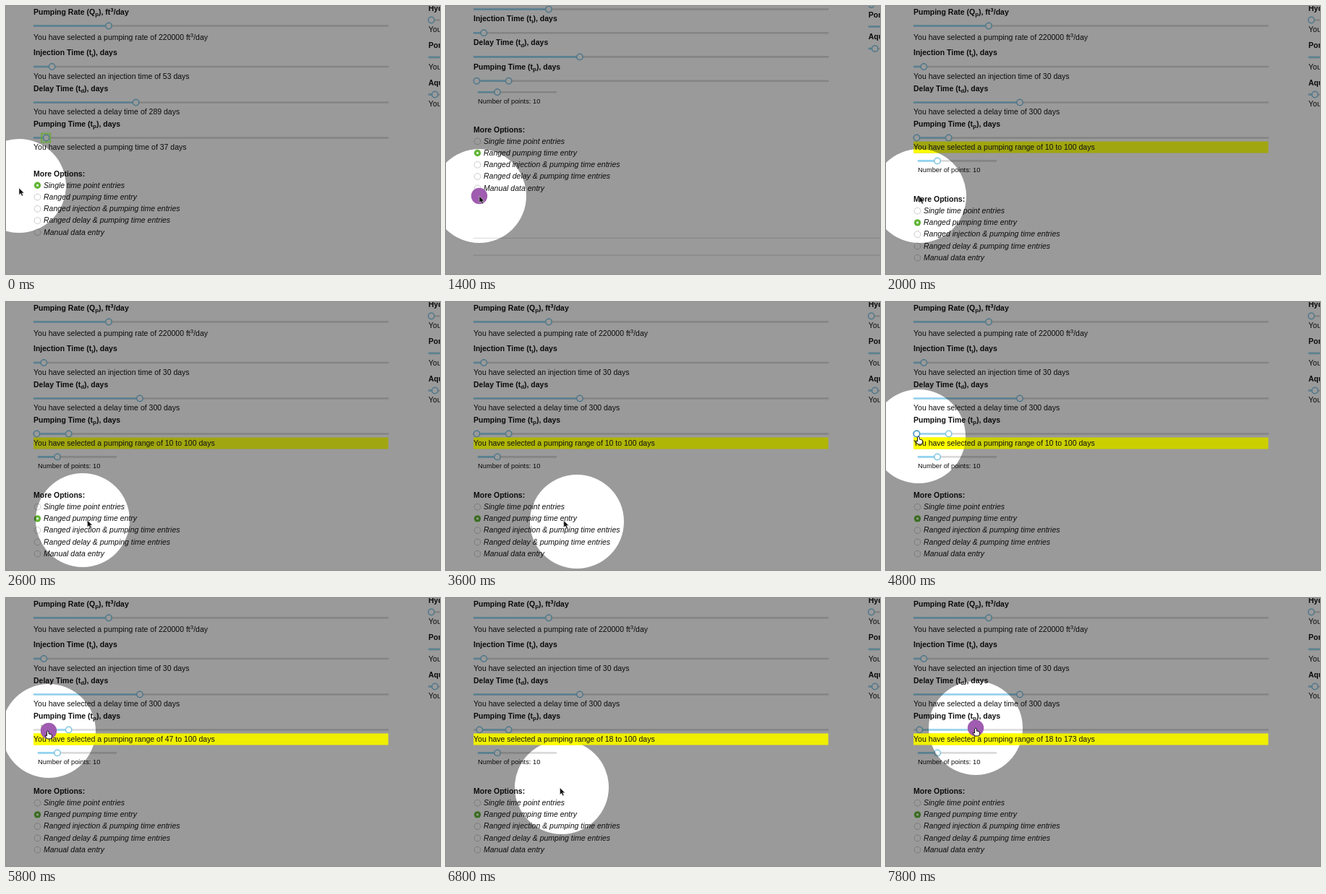
An HTML page that plays this animation: 600 by 371 pixels, repeating every 8000 ms.

```html
<!DOCTYPE html>
<html lang="en">
<head>
<meta charset="utf-8">
<title>Pumping time sliders</title>
<style>
  html, body { margin: 0; width: 100%; height: 100%; overflow: hidden; background: #999; }
  svg { display: block; width: 100%; height: 100%; }
  text { font: 10.5px "Liberation Sans", Arial, sans-serif; fill: #111; white-space: pre; }
  .b { font-weight: bold; }
  .i { font-style: italic; }
  .s { font-size: 9.3px; }
  .small { font-size: 7.9px; }
</style>
</head>
<body>
<svg id="stage" viewBox="0 0 600 371"></svg>
<script>
const LOOP = 8000, STEP = 200, LEAD = 50, R = 65;
const BLUE = '#93d5f0', TRACK = '#dadada';
const stage = document.getElementById('stage');

// time, x, y of the spotlight; the pointer runs slightly ahead of it
const path = [
  [0, 18, 249], [200, 18, 261], [600, 140, 159], [800, 166, 190],
  [1200, 46, 263], [2200, 46, 263], [2400, 67, 262], [2600, 106, 302],
  [3200, 184, 304], [3600, 181, 304], [3800, 108, 298], [4400, 45, 186],
  [5000, 45, 186], [5800, 59, 184], [6400, 46, 183], [6800, 160, 262],
  [7000, 150, 265], [7200, 150, 265], [7400, 88, 181], [7800, 124, 180]
];
const lowDays = [[5000, 10], [5800, 47], [6400, 18]];
const highDays = [[7400, 100], [7800, 173]];

function at(keys, t) {
  const next = keys.findIndex(k => k[0] > t);
  if (next === 0) return keys[0].slice(1);
  if (next < 0) return keys[keys.length - 1].slice(1);
  const a = keys[next - 1], b = keys[next], p = (t - a[0]) / (b[0] - a[0]);
  return a.slice(1).map((v, i) => v + (b[i + 1] - v) * p);
}

const within = (t, from, to) => t >= from && t < to;
const dayX = days => 37.5 + days * .4915;
const text = (x, y, str, cls = '') => `<text x="${x}" y="${y}" class="${cls}">${str}</text>`;
const shifted = (str, dy) =>
  `<tspan class="small" dy="${dy}">${str}</tspan><tspan dy="${-dy}">\u200b</tspan>`;
const sub = str => shifted(str, 2.6);
const sup = str => shifted(str, -4);
const circle = (x, y, r, attrs = '') => `<circle cx="${x}" cy="${y}" r="${r}" ${attrs}/>`;
const line = (x1, x2, y, color, w = 2.6) =>
  `<path d="M${x1} ${y}H${x2}" stroke="${color}" stroke-width="${w}" stroke-linecap="round"/>`;
const thumb = (x, y, color = '#7fc4e2') =>
  circle(x, y, 4.2, `fill="#fff" stroke="${color}" stroke-width="1.5"`);

function slider(y, from, to, thumbs, x1 = 39, x2 = 528) {
  return line(x1, x2, y, TRACK) + line(from, to, y, BLUE) + thumbs.map(x => thumb(x, y)).join('');
}

function radios(top, selected) {
  const names = ['Single time point entries', 'Ranged pumping time entry',
    'Ranged injection &amp; pumping time entries', 'Ranged delay &amp; pumping time entries',
    'Manual data entry'];
  return text(38, top, 'More Options:', 'b') + names.map((name, i) => {
    const y = top + 16 + i * 16.25;
    const mark = i === selected
      ? circle(43.5, y - 3.2, 4.7, 'fill="#62b536"') + circle(43.5, y - 3.2, 1.5, 'fill="#fff"')
      : circle(43.5, y - 3.2, 4.4, 'fill="#fff" stroke="#c4c4c4" stroke-width=".9"');
    return mark + text(52, y, name, 'i');
  }).join('');
}

function sideGroup(label, labelY, trackY, filledTo, thumbX) {
  return text(584, labelY, label, 'b') + line(585, 602, trackY, TRACK) +
    line(585, filledTo, trackY, BLUE) + (thumbX ? thumb(thumbX, trackY) : '');
}

function sideColumn(compact) {
  const pitch = compact ? 30.5 : 51.5, top = compact ? -2 : 19.5;
  const gap = compact ? 13 : 12.8;
  const rows = [['Hydraulic', 586, 588], ['Porosity', 602, 0], ['Aquifer', 593, 593]];
  return rows.map(([label, filledTo, thumbX], i) => {
    const y = top + i * pitch;
    return sideGroup(label, y - gap, y, filledTo, thumbX) +
      (compact ? '' : text(584, y + 16.5, 'You have'));
  }).join('');
}

function form(t, low, high) {
  const ranged = t >= 1400, compact = within(t, 1400, 1800);
  const injection = ranged ? 30 : 53, delay = ranged ? 300 : 289;
  const tracks = compact ? [4.5, 37.2, 70.4, 103.7] : [27.5, 84, 133.5, 182.5];
  const labels = [`Pumping Rate (Q${sub('p')}), ft${sup('3')}/day`, `Injection Time (t${sub('i')}), days`,
    `Delay Time (t${sub('d')}), days`, `Pumping Time (t${sub('p')}), days`];
  let out = labels.map((label, i) => text(38, tracks[i] - 16, label, 'b')).join('');
  out += [142, dayX(injection), dayX(delay)].map((x, i) => slider(tracks[i], 39, x, [x])).join('');
  out += ranged
    ? slider(tracks[3], dayX(low), dayX(high), [dayX(low), dayX(high)])
    : slider(tracks[3], 39, dayX(37), [dayX(37)]);
  if (!compact) {
    out += text(38, 46.5, `You have selected a pumping rate of 220000 ft${sup('3')}/day`) +
      text(38, 100.7, `You have selected an injection time of ${injection} days`) +
      text(38, 150, `You have selected a delay time of ${delay} days`);
  }
  if (ranged) {
    const y = compact ? 119.3 : 214.4;
    out += slider(y, 45, 71, [71], 45, 152) + text(44, y + 15.2, 'Number of points: 10', 's');
  } else {
    out += text(38, 199, 'You have selected a pumping time of 37 days');
  }
  if (compact) out += line(38, 600, 321.3, '#d8d8d8', 1) + line(38, 600, 345, '#d4d4d4', 1);
  if (within(t, 4400, 5000)) out += thumb(dayX(low), tracks[3], '#3f94c4');
  const optionsY = compact ? 174.5 : ranged ? 270.8 : 235.5;
  return out + radios(optionsY, ranged ? 1 : 0) + sideColumn(compact);
}

function resultBar(t, low, high) {
  const color = t < 3600 ? '#a0a60f' : t < 4800 ? '#b0b606' : t < 5800 ? '#cbcf00' : '#efef00';
  const bar = 'x="38" y="187.5" width="490.5" height="16"';
  return `<rect ${bar} fill="${color}"/><rect ${bar} fill="#ff0" clip-path="url(#spot)"/>` +
    text(38, 199, `You have selected a pumping range of ${low} to ${high} days`);
}

function focusBox(color) {
  return `<rect x="49.2" y="176.5" width="12" height="12" fill="none" stroke="${color}" stroke-width="1.8"/>`;
}

function pointer(x, y, hand) {
  const shape = hand
    ? 'M-1.5 1Q0-1 1.2 1V4L5 5Q6 5.5 5.5 8L4.5 11H-1L-4 7Q-4 5-1.5 7Z'
    : 'M0 0V9.5L2.2 7.5 3.9 11 5.6 10.2 4 6.9H7Z';
  const paint = hand
    ? 'fill="#fff" stroke="#111"'
    : 'fill="#111" stroke="#ddd" stroke-width=".6"';
  return `<path d="${shape}" transform="translate(${x} ${y})" ${paint}/>`;
}

function scene(t) {
  const [x, y] = at(path, t), [px, py] = at(path, t + LEAD);
  const low = Math.round(at(lowDays, t)[0]), high = Math.round(at(highDays, t)[0]);
  const pressed = within(t, 1200, 1600) || within(t, 5000, 6600) || t >= 7600;
  const hand = within(t, 4400, 6600) || t >= 7400;
  const hole = `M0 0H600V371H0ZM${x - R} ${y}a${R} ${R} 0 1 0 ${2 * R} 0a${R} ${R} 0 1 0 ${-2 * R} 0Z`;
  let out = `<clipPath id="spot">${circle(x, y, R)}</clipPath>
    <rect width="600" height="371" fill="#fff"/>` + form(t, low, high) +
    `<path d="${hole}" fill-opacity=".395" fill-rule="evenodd"/>`;
  if (t < 1400) out += focusBox('#69a83c');
  if (within(t, 5400, 6000)) out += focusBox('#b4c0a2');
  if (t >= 1800) out += resultBar(t, low, high);
  if (pressed) out += circle(x, y, 11.2, 'fill="#9f5cb0"');
  return out + pointer(px, py, hand);
}

let shown = -1;
function play(now) {
  const t = Math.floor(now % LOOP / STEP) * STEP;
  if (t !== shown) stage.innerHTML = scene(shown = t);
  requestAnimationFrame(play);
}
play(performance.now());
</script>
</body>
</html>
```
